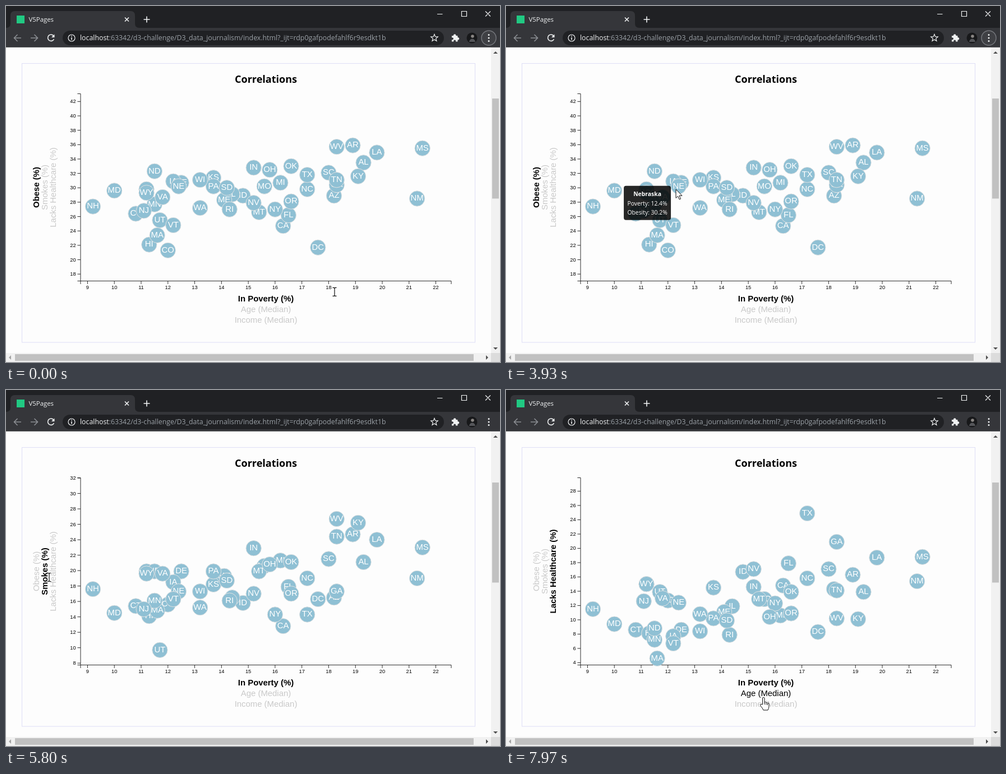
An HTML page for the animation above (8 s loop, 881 px wide and 635 px high).

```html
<!DOCTYPE html>
<html lang="en">
<head>
<meta charset="utf-8">
<title>Correlations</title>
<style>
html, body { margin: 0; width: 100%; height: 100%; overflow: hidden; background: #fdfdfd; }
svg { display: block; width: 100vw; height: 100vh; }
text { font-family: "Liberation Sans", Arial, sans-serif; white-space: pre; }
.ui text, .ui-text { font-family: "Open Sans", "Noto Sans", sans-serif; }
.axis text { font-size: 9.3px; fill: #000; }
.axis path, .axis line { stroke: #222; fill: none; stroke-width: .95; }
.label { font-size: 14.9px; text-anchor: middle; }
.dot { fill: #8fc0d4; stroke: #e3e3e3; stroke-width: .93; }
.abbr { fill: #fff; font-size: 14.9px; text-anchor: middle; }
.line { fill: none; stroke: #f1f3f4; stroke-width: 1.6; }
.thin { stroke-width: 1.2; }
.dim { stroke: #8b8e93; }
</style>
</head>
<body>
<svg id="stage" viewBox="0 0 881 635" preserveAspectRatio="none">
  <rect width="881" height="635" fill="#fdfdfd"/>
  <rect x="28.5" y="102.5" width="808" height="497.5" fill="#fdfdfd" stroke="#dedef6"/>
  <text class="ui-text" x="463.5" y="137.2" font-size="18" font-weight="700" text-anchor="middle">Correlations</text>
  <g id="chart"></g>
  <g id="scrollbars">
    <path d="M865 73H881V635H0V619H865Z" fill="#f1f1f1"/>
    <rect x="865" y="619" width="16" height="16" fill="#dcdcdc"/>
    <rect x="867" y="165" width="12" height="178.5" fill="#c1c1c1"/>
    <rect x="16" y="621" width="818" height="12" fill="#c1c1c1"/>
    <path d="M869 85L873 81L877 85ZM869 609L873 613L877 609ZM856 623L860 627L856 631Z" fill="#505050"/>
    <path d="M9 623L5 627L9 631Z" fill="#a3a3a3"/>
  </g>
  <g class="ui">
    <rect width="881" height="73.5" fill="#202124"/>
    <path d="M0 39Q8 39 8 31V17Q8 9 16 9H222Q230 9 230 17V31Q230 39 238 39H881V73.5H0Z" fill="#35363a"/>
    <rect x="101" y="44" width="680" height="26" rx="13" fill="#202124"/>
    <rect x="19" y="17" width="14" height="14" fill="#21c982"/>
    <text x="40.5" y="28" font-size="11.4" fill="#f1f3f4">V5Pages</text>
    <path class="line" d="M212 20.5L219 27.5M219 20.5L212 27.5M251 18.5V29.5M245.5 24H256.5"/>
    <path class="line thin" d="M769 14.5H778.5M812.5 9.5H821.5V18.5H812.5ZM855 9.5L864 18.5M864 9.5L855 18.5"/>
    <path class="line dim" d="M27 57H15M20.5 51L14.5 57L20.5 63M44 57H56M50.5 51L56.5 57L50.5 63"/>
    <path class="line" d="M85 53.5A5.7 5.7 0 1 0 85.5 59"/>
    <path d="M86.5 50.5V56H81Z" fill="#f1f3f4"/>
    <circle class="line thin" cx="117" cy="57" r="6"/>
    <path class="line" d="M117 56V60.5M117 53V54.5"/>
    <text x="132" y="61.3" font-size="12.33" fill="#9aa0a6"><tspan fill="#f1f3f4">localhost</tspan>:63342/d3-challenge/D3_data_journalism/index.html?_ijt=rdp0gafpodefahlf6r9esdkt1b</text>
    <path id="star" class="line thin"/>
    <path d="M795 53H798A2.3 2.3 0 1 1 802.5 53H805.5V56A2.3 2.3 0 1 1 805.5 60.5V63.5H802A2 2 0 1 0 798.5 63.5H795V60A2 2 0 1 0 795 56.5Z" fill="#f1f3f4"/>
    <circle cx="831" cy="57" r="9.5" fill="#17181a"/>
    <circle cx="832" cy="54" r="2.8" fill="#8a8684"/>
    <path d="M826 64Q827 58.5 831.5 58.5T837 64Z" fill="#55565a"/>
    <circle id="ring" cx="861" cy="57" r="13" fill="#3f4044" stroke="#74767b" stroke-width="1.5"/>
    <path d="M861 51.5h.01M861 57h.01M861 62.5h.01" stroke="#f1f3f4" stroke-width="3" stroke-linecap="round"/>
  </g>
  <g id="tip" class="ui" fill="#fff" font-size="10.4" font-weight="500" text-anchor="middle">
    <rect x="-42" width="84" height="61" rx="4" fill="#000" fill-opacity=".85"/>
    <text y="18" font-weight="700"></text>
    <text y="34.8"></text>
    <text y="51.5"></text>
  </g>
  <g id="pointer" stroke-linejoin="round">
    <path d="M0 0V15.5L3.6 12.2L6.2 18L8.6 17L6 11.3H11Z" fill="#fff" stroke="#111"/>
    <path d="M-3.5 -7.5H-1L0 -6.5L1 -7.5H3.5M0 -6.5V6.5M-3.5 7.5H-1L0 6.5L1 7.5H3.5" fill="none" stroke="#111" stroke-width="1.2"/>
    <path d="M-1.5 12V1A1.7 1.7 0 0 1 2 1V8Q3.5 6.5 5 8.5Q6.5 7.5 7.5 9.3Q10 8.5 10 11.5V15Q10 18 8 22H0Q-1.5 18 -5 14.5Q-6 11 -3.5 11.5ZM2 8V12M5 9V12.5M7.5 10V13" fill="#fff" stroke="#111"/>
  </g>
</svg>
<script>
const LOOP = 8000, MOVE = 540, FADE = 300;
const LEFT = 133, RIGHT = 794, TOP = 156.5, BOTTOM = 490.5, MID = 463.5, R = 13.7;

const $ = id => document.getElementById(id);
const words = s => s.trim().split(/\s+/);
const mix = (a, b, p) => a + (b - a) * p;
const clamp = v => Math.max(0, Math.min(1, v));
const cubic = t => t < .5 ? 4 * t ** 3 : 1 - 4 * (1 - t) ** 3;

// Linear path through points [position, ...values], held after the last one
function along(points, at) {
  const i = points.findIndex(p => p[0] > at);
  if (i < 0) return points[points.length - 1].slice(1);
  const a = points[i - 1], b = points[i];
  return a.slice(1).map((v, k) => mix(v, b[k + 1], (at - a[0]) / (b[0] - a[0])));
}

function add(parent, tag, attrs, text) {
  const el = document.createElementNS('http://www.w3.org/2000/svg', tag);
  for (const k in attrs) el.setAttribute(k, attrs[k]);
  if (text !== undefined) el.textContent = text;
  return parent.appendChild(el);
}

// States from lowest to highest, ties joined by "/". Values run evenly
// between the few anchors written after a colon.
function ranked(text) {
  const steps = words(text).map(s => s.split(':'));
  const anchors = steps.map(([, v], rank) => [rank, +v]).filter(a => a[1]);
  const values = {};
  steps.forEach(([tied], rank) => {
    const v = Math.round(along(anchors, rank)[0] * 10) / 10;
    for (const abbr of tied.split('/')) values[abbr] = v;
  });
  return values;
}
const poverty = ranked(`NH:9.2 MD CT:10.8 NJ:11.1 AK/WY HI MN/ND MA UT VA:11.8 CO IA/VT NE:12.4
  DE:12.5 WA/WI:13.2 KS/PA ME:14.1 SD RI IL:14.4 ID IN/NV:15.2 MT MO OH NY MI:16.2 CA FL
  OK/OR:16.6 NC/TX:17.2 DC SC:18 AZ GA/TN/WV:18.3 AR:18.9 KY AL:19.3 LA:19.8 NM:21.3 MS:21.5`);
const obesity = ranked(`CO:21.3 DC HI:22.1 MA CA:24.7 VT:24.8 UT FL:26.2 CT MT NJ NY/RI WA NH MN NV
  OR ME NM VA AZ/ID:28.9 IL WY MD AK/NC SD MO/NE/PA:30.2 GA DE/MI IA TN/WI KS KY TX SC ND OH IN
  OK:33 AL:33.5 LA:34.9 MS:35.5 WV AR:35.9`);
const smokes = ranked(`UT:9.7 CA:12.8 HI:14.1 NY/TX MD MA NJ WA CT CO ID MN/RI DC/VT AZ/IL:16.5
  NV/OR:17 GA/NE/WI NH FL KS IA SD NC/NM ME VA/WY AK/DE/MT/ND/PA:19.9 MO:20.6 OH AL/OK MI SC:21.5
  IN:22.9 MS:23 LA:24 TN AR:24.7 KY:26.2 WV:26.7`);
const healthcare = ranked(`MA:4.6 VT:6.7 MN IA:7.7 RI HI DC WI CT/DE ND:8.8 MD SD:9.9 KY PA/WV OH MI
  WA OR ME:11.1 NH IL NY:12.3 NE NJ CO MO/MT VA:13 AL/OK/UT:13.9 TN AZ KS IN CA AK/WY:15 NM NC AR
  ID NV/SC:17.1 FL LA:18.7 MS:18.8 GA:20.9 TX:24.9`);

// Stacking order: alphabetical by full name
const abbrs = words(`AL AK AZ AR CA CO CT DE DC FL GA HI ID IL IN IA KS KY LA ME MD MA MI MN MS MO
  MT NE NV NH NJ NM NY NC ND OH OK OR PA RI SC SD TN TX UT VT VA WA WV WI WY`);
const tipNames = { WA: 'Washington', NE: 'Nebraska', WY: 'Wyoming', MD: 'Maryland' };

function scale(data, low, high, start, end) {
  const all = Object.values(data);
  const min = Math.min(...all) * low, max = Math.max(...all) * high;
  const at = v => mix(start, end, (v - min) / (max - min));
  return { data, at, has: v => v >= min && v <= max };
}
const xScale = scale(poverty, .95, 1.05, LEFT, RIGHT);
const yScales = [obesity, smokes, healthcare].map(d => scale(d, .8, 1.2, BOTTOM, TOP));
const clicks = [0, 5053, 6655], hovers = [0, 4780, 6520];

// Axes, axis titles and state circles
const chart = $('chart');
const axis = add(chart, 'g', { class: 'axis' });
add(axis, 'path', { d: `M127.4 ${TOP}H${LEFT}V${BOTTOM}H127.4M${LEFT} 496V${BOTTOM}H${RIGHT}V496` });
for (let v = 9; v <= 22; v++) {
  const x = xScale.at(v);
  add(axis, 'line', { x1: x, x2: x, y1: BOTTOM, y2: 496 });
  add(axis, 'text', { x, y: 505.4, 'text-anchor': 'middle' }, v);
}
const ticks = [];
for (let v = 4; v <= 42; v += 2) {
  const g = add(axis, 'g', {});
  add(g, 'line', { x1: 127.4, x2: LEFT });
  add(g, 'text', { x: 124.6, y: 3, 'text-anchor': 'end' }, v);
  ticks.push({ v, g });
}
const xLabels = ['In Poverty (%)', 'Age (Median)', 'Income (Median)'].map((s, i) =>
  add(chart, 'text', {
    class: 'label', x: MID, y: 527.3 + 18.6 * i,
    fill: i ? '#c9c9c9' : '#000', 'font-weight': i ? 400 : 700
  }, s));
const yLabels = ['Obese (%)', 'Smokes (%)', 'Lacks Healthcare (%)'].map((s, i) =>
  add(chart, 'text', {
    class: 'label',
    transform: `translate(${59.3 + 14.9 * i} ${(TOP + BOTTOM) / 2}) rotate(-90)`
  }, s));
const states = abbrs.map(abbr => {
  const g = add(chart, 'g', {});
  add(g, 'circle', { class: 'dot', r: R });
  add(g, 'text', { class: 'abbr', y: 3.8 }, abbr);
  return { abbr, g, x: xScale.at(poverty[abbr]), y: 0 };
});

let star = '';
for (let k = 0; k < 10; k++) {
  const a = k * Math.PI / 5, r = k % 2 ? 2.9 : 6.6;
  star += `${k ? 'L' : 'M'}${764 + r * Math.sin(a)} ${57 - r * Math.cos(a)}`;
}
$('star').setAttribute('d', star + 'Z');

// Pointer stops: time, x, y
const stops = [
  [0, 586, 510], [830, 562, 481], [1730, 345, 391], [2070, 352, 350], [2670, 352, 350],
  [3490, 313, 334], [3600, 303, 327], [3940, 303, 327], [4750, 77, 334], [6150, 77, 334],
  [6800, 97, 346], [7130, 98, 371], [7790, 411, 529], [7960, 459, 549]
];
function pointerShape(t) {
  if (t < 400 || (t > 4740 && t < 7220)) return 1;
  return t > 7820 ? 2 : 0;
}

const place = (el, x, y) => el.setAttribute('transform', `translate(${x} ${y})`);
const show = (el, on) => el.setAttribute('visibility', on ? 'visible' : 'hidden');
const tip = $('tip'), pointer = $('pointer'), ring = $('ring');
const tipLines = tip.querySelectorAll('text');

function drawChart(now, t) {
  const from = yScales[Math.max(0, now - 1)], to = yScales[now];
  const p = now ? cubic(clamp((t - clicks[now]) / MOVE)) : 1;
  for (const { v, g } of ticks) {
    place(g, 0, mix(from.at(v), to.at(v), p));
    g.setAttribute('opacity', mix(+from.has(v), +to.has(v), p));
  }
  for (const s of states) {
    s.y = mix(from.at(from.data[s.abbr]), to.at(to.data[s.abbr]), p);
    place(s.g, s.x, s.y);
  }
}

function drawLabels(now, t) {
  yLabels.forEach((el, i) => {
    let shade = 201;
    if (i === now || (i === now + 1 && t >= hovers[i])) shade = 0;
    else if (i === now - 1) shade = Math.round(201 * clamp((t - clicks[now]) / FADE));
    el.setAttribute('fill', `rgb(${shade},${shade},${shade})`);
    el.setAttribute('font-weight', i === now ? 700 : 400);
  });
  xLabels[1].setAttribute('fill', t > 7820 ? '#000' : '#c9c9c9');
}

function drawTip(x, y) {
  const hit = states.filter(s => Math.hypot(s.x - x, s.y - y) < R).pop();
  const name = hit && tipNames[hit.abbr];
  show(tip, name);
  if (!name) return;
  place(tip, hit.x - 55.8, hit.y - 1);
  [name, `Poverty: ${poverty[hit.abbr]}%`, `Obesity: ${obesity[hit.abbr]}%`]
    .forEach((s, k) => { tipLines[k].textContent = s; });
}

function draw(t) {
  const now = clicks.filter(c => c <= t).length - 1;
  const [x, y] = along(stops, t);
  drawChart(now, t);
  drawLabels(now, t);
  drawTip(x, y);
  show(ring, now === 0);
  place(pointer, x, y);
  [...pointer.children].forEach((el, k) => show(el, k === pointerShape(t)));
}

const start = performance.now();
function tick() {
  draw((performance.now() - start) % LOOP);
  requestAnimationFrame(tick);
}
tick();
</script>
</body>
</html>
```
